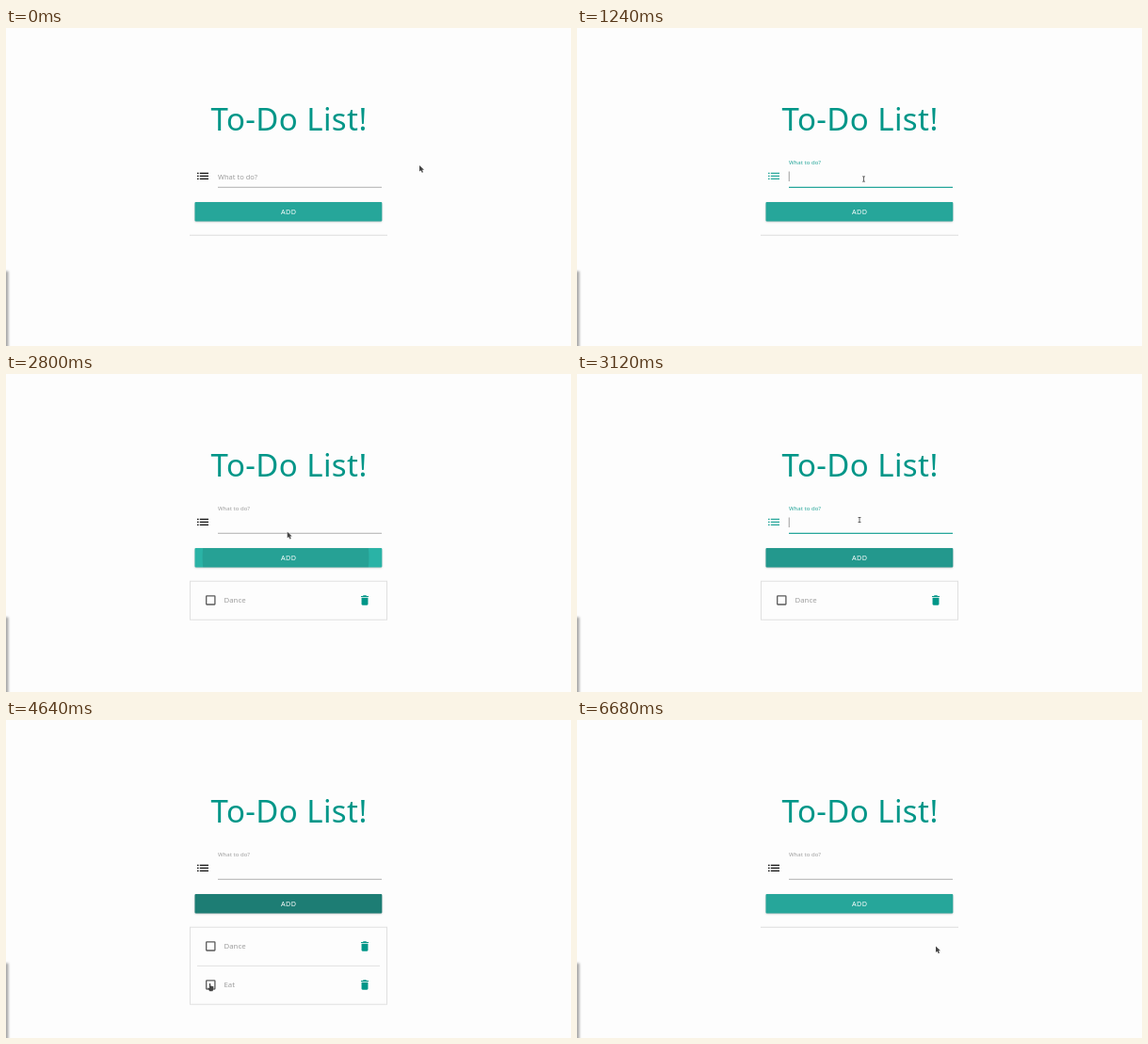
Write an HTML page that moves like this. It is 600 by 338 pixels and loops after 7720 ms.

```html
<!DOCTYPE html>
<html lang="en">
<head>
<meta charset="utf-8">
<title>To-Do List</title>
<style>
html, body { margin: 0; width: 100%; height: 100%; overflow: hidden; background: #fdfdfd; }
svg { display: block; width: 600px; height: 338px; font-family: 'Noto Sans', 'Open Sans', sans-serif; }
.item { font-size: 7.8px; fill: #9e9e9e; }
</style>
</head>
<body>
<svg viewBox="0 0 600 338">
  <defs>
    <filter id="soft" x="-100%" width="300%"><feGaussianBlur stdDeviation=".9"/></filter>
    <clipPath id="face"><rect x="200.5" y="185" width="198.8" height="20.4" rx="1"/></clipPath>
  </defs>
  <rect x="-10" y="258.5" width="12.6" height="100" fill="#aaa" filter="url(#soft)"/>
  <text x="300.6" y="108.7" font-size="33" letter-spacing=".42" text-anchor="middle" fill="#009688">To-Do List!</text>

  <path id="icon" stroke-width="1.25" d="M203 154.4h1.6m1.2 0h9.2M203 157.4h1.6m1.2 0h9.2M203 160.4h1.6m1.2 0h9.2"/>
  <text id="label" x="225">What to do?</text>
  <text id="value" x="225" y="161" font-size="8.4" fill="#222"></text>
  <rect id="caret" y="152.5" width=".8" height="10.5" fill="#888"/>
  <path id="line" d="M225 169.3H399"/>

  <rect x="200.7" y="186" width="198.4" height="20" rx="1" fill="#000" opacity=".25" filter="url(#soft)"/>
  <g clip-path="url(#face)">
    <rect id="button" x="200" y="185" width="200" height="21"/>
    <circle id="ripple" cx="297" cy="195" fill="#000"/>
  </g>
  <text x="300.3" y="198" font-size="7.2" letter-spacing=".5" text-anchor="middle" fill="#fff">ADD</text>

  <rect id="card" x="195.5" y="220.2" width="209" fill="none" stroke="#e0e0e0"/>
  <path id="rule" d="M203 261.3H397" stroke="#e0e0e0"/>
  <g id="rows"></g>
  <path id="mouse" fill="#444" stroke="#fff" stroke-width=".4" stroke-linejoin="round" paint-order="stroke"/>
</svg>
<script>
const $ = id => document.getElementById(id);
const LOOP = 7720, ROW = 41, TEAL = '#26a69a', GRAY = '#9e9e9e';

// Each item's story, in ms
const items = [
  { name: 'Dance', focus: 960, type: 1400, click: 2580, add: 2680, blur: 3000, check: 5240, remove: 6200 },
  { name: 'Eat', focus: 3000, type: 3200, click: 4100, add: 4200, blur: 4720, check: 4720, remove: 6560 }
];

const START = [439, 146], FIELD = [304.5, 160.5], BUTTON = [296.5, 190], BIN = [381, 240.4];
const moves = [
  { from: 360, to: 800, at: FIELD },
  { from: 2200, to: 2500, at: BUTTON },
  { from: 2600, to: 2940, at: [300, 155] },
  { from: 3680, to: 4000, at: BUTTON },
  { from: 4200, to: 4600, at: [214.5, 239 + ROW] },
  { from: 4800, to: 5120, at: [215, 239] },
  { from: 5300, to: 5660, at: [382.5, 246] },
  { from: 5700, to: 5980, at: BIN }
];
const shapes = {
  arrow: 'M0 0V6.6L1.6 5.3L2.8 7.8L4 7.2L2.9 4.8H5Z',
  hand: 'M1.4 0h1.3v2.5l3.2.8v2.8l-1 2.2h-3.2l-2.2-3.2.8-.7 1.1.8z',
  beam: 'M-1.5-3H1.5V-2.3H.4V2.3H1.5V3H-1.5V2.3H-.4V-2.3H-1.5Z'
};

const clamp = u => Math.max(0, Math.min(1, u));
const ramp = (t, start, len = 200) => {
  const u = clamp((t - start) / len);
  return u * u * (3 - 2 * u);
};
const pulse = (t, on, off) => ramp(t, on) - ramp(t, off);
const mix = (a, b, u) => a.map((v, i) => v + (b[i] - v) * u);
const set = (el, attrs) => { for (const k in attrs) el.setAttribute(k, attrs[k]); };

$('rows').innerHTML = items.map(item => `<g>
  <rect x="212.7" y="235.8" width="9.2" height="9.2" rx=".5" fill="none" stroke="#5a5a5a" stroke-width="1.3"/>
  <path d="M212 241.3L215.6 245L223.3 236" fill="none" stroke="${TEAL}" stroke-width="1.3"/>
  <text class="item" x="231.5" y="243.4">${item.name}</text>
  <path fill="#009688" transform="translate(374.1 233.6) scale(.575)" d="M6 19c0 1.1.9 2 2 2h8c1.1 0 2-.9 2-2V7H6zM19 4h-3.5l-1-1h-5l-1 1H5v2h14z"/>
</g>`).join('');
const rowEls = [...$('rows').children];

// Typing speeds up slightly with each key
const keyTime = (item, i) => item.type + 170 * i - 10 * i * i;

function drawInput(t) {
  const item = items.find(it => t >= it.focus && t < it.add);
  const focused = item && t < item.click;
  const color = focused ? TEAL : GRAY;
  const keys = item ? [...item.name].map((_, i) => keyTime(item, i)).filter(k => k <= t) : [];
  const up = ramp(t, items[0].focus);
  $('value').textContent = item ? item.name.slice(0, keys.length) : '';
  set($('label'), { y: 161 - 16 * up, 'font-size': 7.5 - 1.45 * up, fill: color });
  set($('icon'), { stroke: focused ? TEAL : '#111' });
  set($('line'), { stroke: color, 'stroke-width': focused ? 1.15 : .8 });
  const lit = focused && (t - (keys.at(-1) ?? item.focus)) % 1000 < 500;
  const width = keys.length ? $('value').getComputedTextLength() : 0;
  set($('caret'), { x: 224.8 + width, opacity: lit ? 1 : 0 });
}

function drawButton(t) {
  let color = [38, 166, 154];
  for (const { click, blur } of items) {
    color = mix(color, [43, 181, 168], pulse(t, click - 180, click + 200));
    color = mix(color, [29, 125, 116], pulse(t, click + 200, blur));
  }
  set($('button'), { fill: `rgb(${color.map(Math.round)})` });
  const pressed = items.find(it => t >= it.click && t < it.click + 400);
  const age = pressed ? t - pressed.click : 0;
  set($('ripple'), { r: age * .4, opacity: .1 * (1 - ramp(age, 240, 160)) });
}

function drawList(t) {
  let count = 0;
  items.forEach((item, i) => {
    const el = rowEls[i], shown = t >= item.add && t < item.remove;
    el.style.display = shown ? '' : 'none';
    if (!shown) return;
    const done = ramp(t, item.check);
    set(el, { transform: `translate(0 ${ROW * count++})` });
    set(el.children[0], { opacity: 1 - done, transform: `rotate(${40 * done} 217 240.5)` });
    set(el.children[1], { opacity: done });
  });
  set($('card'), { height: Math.max(.1, ROW * count) });
  $('rule').style.display = count > 1 ? '' : 'none';
  return count;
}

function drawMouse(t, count) {
  const [x, y] = moves.reduce((p, m) => mix(p, m.at, ramp(t, m.from, m.to - m.from)), START);
  const inside = (l, top, r, b) => x > l && x < r && y > top && y < b;
  const onRow = n => inside(208, 232 + ROW * n, 256, 249 + ROW * n) || inside(375, 233 + ROW * n, 387, 245.5 + ROW * n);
  const kind = inside(225, 146, 399, 166) ? 'beam'
    : inside(201, 185, 399, 206) || items.slice(0, count).some((_, n) => onRow(n)) ? 'hand' : 'arrow';
  set($('mouse'), { d: shapes[kind], transform: `translate(${x} ${y})` });
}

function frame(now) {
  const t = Math.max(0, now) % LOOP;
  drawInput(t);
  drawButton(t);
  drawMouse(t, drawList(t));
  requestAnimationFrame(frame);
}
frame(performance.now());
</script>
</body>
</html>
```
